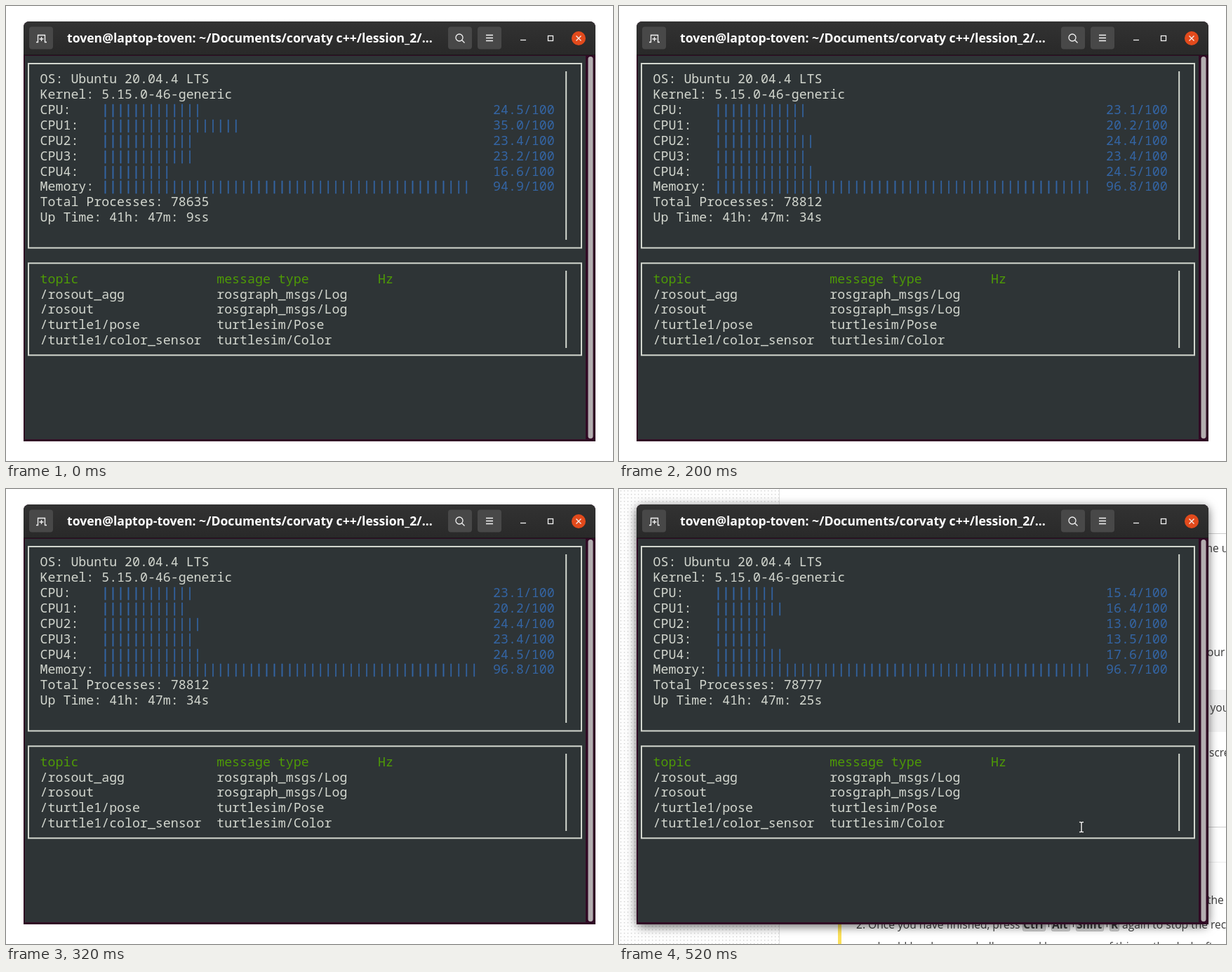
These frames come from a looping animation (865 by 648 pixels, 600 ms). An HTML page:

```html
<!DOCTYPE html>
<html lang="en">
<head>
<meta charset="utf-8">
<title>System monitor</title>
<style>
  html, body { margin: 0; width: 100%; height: 100%; overflow: hidden; background: #fff; }
  svg { display: block; }
  text { white-space: pre; }
  .mono { font: 18.25px "Noto Sans Mono", "DejaVu Sans Mono", monospace; fill: #d3d7cf; }
  .mono .blue { fill: #3465a4; }
  .mono .bars { fill: #3465a4; stroke: #3465a4; stroke-width: .4; }
  .mono .green { fill: #4e9a06; }
  .title { font: bold 17.6px "Open Sans", "Noto Sans", sans-serif; fill: #fff; }
  .page { font: 15.57px "Open Sans", "Noto Sans", sans-serif; fill: #3a3a3a; }
  .key { font-weight: bold; }
  .frame { fill: none; stroke: #d3d7cf; stroke-width: 2; }
  .icon { fill: none; stroke: #f2f2f2; stroke-width: 1.3; }
  .shadow { filter: drop-shadow(0 3px 7px rgba(0, 0, 0, .6)); }

  /* each state shows for one third of the loop */
  .state { animation: turn 600ms step-end infinite; visibility: hidden; }
  .first { animation-delay: -600ms; }
  .second { animation-delay: -400ms; }
  .third { animation-delay: -200ms; }
  @keyframes turn {
    0% { visibility: visible; }
    33.3333%, 100% { visibility: hidden; }
  }
</style>
</head>
<body>
<svg width="865" height="648" viewBox="0 0 865 648">
  <defs>
    <pattern id="dots" width="5" height="5" patternUnits="userSpaceOnUse">
      <rect width="5" height="5" fill="#fdfdfd"/>
      <rect x="2" y="2" width="1.3" height="1.3" fill="#cfcfcf"/>
    </pattern>
    <linearGradient id="bar" x2="0" y2="1">
      <stop stop-color="#323232"/>
      <stop offset="1" stop-color="#292929"/>
    </linearGradient>
    <path id="beam" d="M656 474.5H658L659 475.5L660 474.5H662M659 475V488M656 488.5H658L659 487.5L660 488.5H662"/>
  </defs>

  <!-- page behind the window -->
  <g class="state third page">
    <rect x="1" width="227" height="648" fill="url(#dots)"/>
    <path d="M228.5 0V648" stroke="#e2e2e2"/>
    <path d="M229 63.5H865M229 481.5H865" stroke="#cdcdcd"/>
    <path d="M229 531.5H865" stroke="#ececec"/>
    <rect x="312" y="286" width="553" height="60" fill="#f3f3f3"/>
    <rect x="312" y="560" width="5" height="88" fill="#fbe05a"/>
    <text x="831" y="90">the u</text>
    <text x="838" y="238">our</text>
    <text x="825" y="317">in you</text>
    <text x="841" y="381">scre</text>
    <text x="838" y="591">the</text>
    <g fill="#d6d6d6" stroke="#bdbdbd">
      <rect x="575.5" y="611.5" width="32" height="18" rx="2"/>
      <rect x="616.5" y="611.5" width="26" height="18" rx="2"/>
      <rect x="651.5" y="611.5" width="39" height="18" rx="2"/>
      <rect x="699.5" y="611.5" width="13" height="18" rx="2"/>
    </g>
    <text x="338" y="626">2. Once you have finished, press</text>
    <g class="key">
      <text x="576" y="626">Ctrl</text>
      <text x="617" y="626">Alt</text>
      <text x="652" y="626">Shift</text>
      <text x="701" y="626">R</text>
    </g>
    <text x="608" y="626">+</text>
    <text x="643" y="626">+</text>
    <text x="691" y="626">+</text>
    <text x="717" y="626">again to stop the rec</text>
    <text x="361" y="657">should be shown a challenge and have some of this on the desk after all of</text>
    <rect class="shadow" x="25" y="22" width="815" height="598" rx="8"/>
  </g>

  <!-- window -->
  <path d="M25 620V30a8 8 0 0 1 8-8H832a8 8 0 0 1 8 8V620Z" fill="#300a24"/>
  <path d="M25 70V30a8 8 0 0 1 8-8H832a8 8 0 0 1 8 8V70Z" fill="url(#bar)"/>
  <path d="M25 69.5H840" stroke="#1c1c1c"/>
  <rect x="27" y="71" width="799" height="546" fill="#2e3436"/>
  <rect x="829.5" y="72" width="7" height="544" rx="3.5" fill="#b3aeb0"/>

  <g fill="#484848">
    <rect x="33" y="29.5" width="34" height="32" rx="4"/>
    <rect x="630" y="29.5" width="34" height="32" rx="4"/>
    <rect x="672" y="29.5" width="34" height="32" rx="4"/>
  </g>
  <text class="title" x="87" y="52">toven@laptop-toven: ~/Documents/corvaty c++/lession_2/...</text>
  <circle cx="816" cy="46" r="10" fill="#e24a1c"/>
  <g class="icon">
    <path d="M43 51.5H45.5V41.5H55.5V51.5H58M50.5 44V50M47.5 47H53.5"/>
    <circle cx="646" cy="45" r="5"/>
    <path d="M649.5 48.5L653.5 52.5"/>
    <path d="M684 41.5H694M684 45.5H694M684 49.5H694"/>
    <path d="M733 48.5H741"/>
    <rect x="772.5" y="42.5" width="7" height="7"/>
    <path d="M812.5 42.5L819.5 49.5M819.5 42.5L812.5 49.5"/>
  </g>

  <g class="frame">
    <rect x="32" y="82" width="788" height="262.5"/>
    <rect x="32" y="366.3" width="788" height="131"/>
    <path d="M798.2 93V333M798.2 377V487"/>
  </g>

  <g id="fixed" class="mono"></g>
  <g id="first" class="state first mono"></g>
  <g id="second" class="state second mono"></g>
  <g id="third" class="state third mono"></g>

  <!-- text pointer -->
  <g class="state third" fill="none">
    <use href="#beam" stroke="#1d2021" stroke-width="3"/>
    <use href="#beam" stroke="#f4f4f4" stroke-width="1.5"/>
  </g>
</svg>
<script>
  const colWidth = 10.94, rowHeight = 21.87;

  function put(id, col, row, value, style = "") {
    const el = document.createElementNS("http://www.w3.org/2000/svg", "text");
    el.setAttribute("x", 26.7 + col * colWidth);
    el.setAttribute("y", 88.5 + row * rowHeight);
    el.setAttribute("class", style);
    el.textContent = value;
    document.getElementById(id).append(el);
  }

  const labels = ["OS: Ubuntu 20.04.4 LTS", "Kernel: 5.15.0-46-generic",
    "CPU:", "CPU1:", "CPU2:", "CPU3:", "CPU4:", "Memory:"];
  labels.forEach((label, i) => put("fixed", 2, i + 1, label));

  const topics = [
    ["topic", "message type", "Hz"],
    ["/rosout_agg", "rosgraph_msgs/Log"],
    ["/rosout", "rosgraph_msgs/Log"],
    ["/turtle1/pose", "turtlesim/Pose"],
    ["/turtle1/color_sensor", "turtlesim/Color"]
  ];
  topics.forEach((cells, i) => cells.forEach((cell, j) =>
    put("fixed", [2, 25, 46][j], 14 + i, cell, i ? "" : "green")));

  function reading(id, loads, processes, seconds) {
    loads.forEach((load, i) => {
      put(id, 10, 3 + i, "|".repeat(Math.floor(load / 2) + 1), "bars");
      put(id, 61, 3 + i, load.toFixed(1) + "/100", "blue");
    });
    put(id, 2, 9, "Total Processes: " + processes);
    put(id, 2, 10, "Up Time: 41h: 47m: " + seconds);
  }

  reading("first", [24.5, 35, 23.4, 23.2, 16.6, 94.9], 78635, "9ss");
  reading("second", [23.1, 20.2, 24.4, 23.4, 24.5, 96.8], 78812, "34s");
  reading("third", [15.4, 16.4, 13, 13.5, 17.6, 96.7], 78777, "25s");
</script>
</body>
</html>
```
